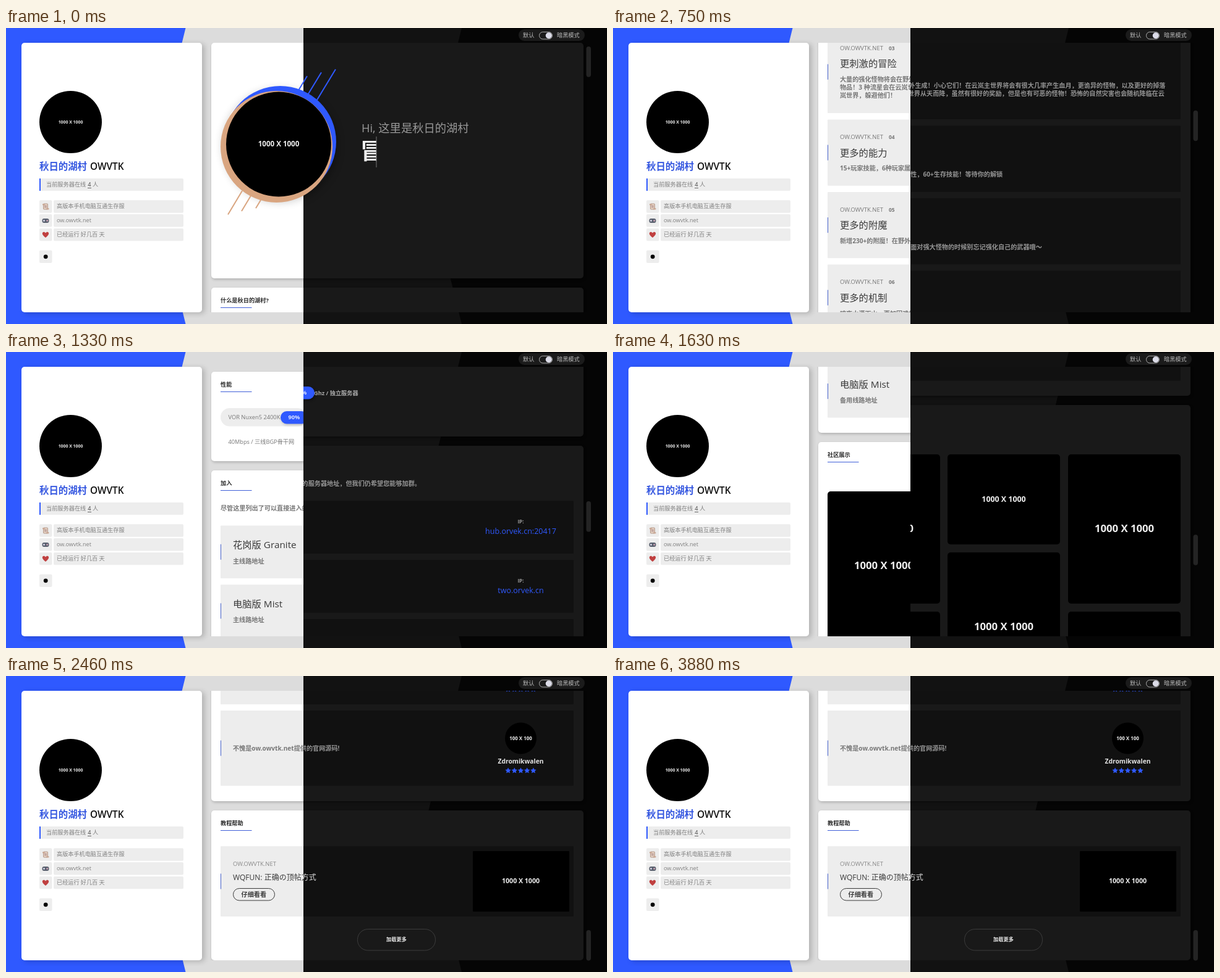
Write an HTML page with a canvas that moves like this. It is 972x480 px and loops after 4000 ms.

```html
<!DOCTYPE html>
<html lang="zh">
<head>
<meta charset="utf-8">
<style>
html, body { margin: 0; width: 100%; height: 100%; overflow: hidden; background: #050505; }
canvas { display: block; }
</style>
</head>
<body>
<canvas id="stage" width="972" height="480"></canvas>
<script>
const ctx = document.getElementById('stage').getContext('2d');
const LOOP = 4000, STEP = 1000 / 24, SPLIT = 481, END = 3330;
const BLUE = '#2f59ff', TAN = '#d9a580';
const TOWN = '秋日的湖村', SITE = 'ow.owvtk.net';

const LIGHT = { left: BLUE, right: '#dcdcdc', edge: 290.5, card: '#fff', item: '#ededed', head: '#2a2a2a', title: '#3a3a3a',
  body: '#777', shadow: 'rgba(0,0,0,.2)', badge: 466,
  path: [[20, 0], [200, 70], [375, 281], [750, 915], [1333, 1808], [1875, 2650], [2080, 2965], [2270, 3250], [2455, END]] };
const DARK = { left: '#121212', right: '#050505', edge: 737, card: '#191919', item: '#111', head: '#ddd', title: '#ddd',
  body: '#949494', shadow: 'rgba(0,0,0,.4)', badge: 477,
  path: [[20, 0], [200, 78], [375, 314], [750, 905], [1333, 1848], [1875, 2724], [2084, 3055], [2252, 3262], [2420, END]] };
let theme = LIGHT;

// Smooth curve through [time, offset] points, at rest on both ends.
function scrollAt(path, t) {
  const last = path.length - 1;
  if (t <= path[0][0]) return 0;
  if (t >= path[last][0]) return END;
  const i = path.findIndex(p => p[0] > t) - 1;
  const slope = k => k < 1 || k >= last ? 0 : (path[k + 1][1] - path[k - 1][1]) / (path[k + 1][0] - path[k - 1][0]);
  const [t0, a] = path[i], [t1, b] = path[i + 1], d = t1 - t0, u = (t - t0) / d;
  return a + (b - a) * u * u * (3 - 2 * u) + d * u * (1 - u) * (slope(i) * (1 - u) - slope(i + 1) * u);
}

function text(str, x, y, size, color, weight = 400, align = 'left') {
  ctx.font = `${weight} ${size}px "Open Sans", "Noto Sans CJK SC", "Noto Sans CJK", sans-serif`;
  ctx.textAlign = align;
  ctx.textBaseline = 'middle';
  ctx.fillStyle = color;
  ctx.fillText(str, x, y + size * 0.04);
  return ctx.measureText(str).width;
}
const body = (str, x, y) => text(str, x, y, 10.13, theme.body, 700);
const center = (str, x, y, size, color = '#eee') => text(str, x, y, size, color, 700, 'center');

function box(x, y, w, h, r, fill, stroke) {
  ctx.beginPath();
  ctx.roundRect(x, y, w, h, r);
  if (fill) { ctx.fillStyle = fill; ctx.fill(); }
  if (stroke) { ctx.strokeStyle = stroke; ctx.lineWidth = 1; ctx.stroke(); }
}
function disc(x, y, r, fill) {
  ctx.beginPath();
  ctx.arc(x, y, r, 0, 7);
  ctx.fillStyle = fill;
  ctx.fill();
}
function line(x1, y1, x2, y2, color, width = 1) {
  ctx.beginPath();
  ctx.moveTo(x1, y1);
  ctx.lineTo(x2, y2);
  ctx.strokeStyle = color;
  ctx.lineWidth = width;
  ctx.stroke();
}
function shaded(draw, blur = 4, dx = 1, dy = 2) {
  ctx.save();
  ctx.shadowColor = theme.shadow;
  ctx.shadowBlur = blur;
  ctx.shadowOffsetX = dx;
  ctx.shadowOffsetY = dy;
  draw();
  ctx.restore();
}
function clipTo(x, y, w, h, draw) {
  ctx.save();
  ctx.beginPath();
  ctx.rect(x, y, w, h);
  ctx.clip();
  draw();
  ctx.restore();
}
function star(x, y) {
  ctx.beginPath();
  for (let i = 0; i < 10; i++) {
    const r = i % 2 ? 2.4 : 5, a = i * Math.PI / 5;
    ctx.lineTo(x + r * Math.sin(a), y - r * Math.cos(a));
  }
  ctx.fillStyle = BLUE;
  ctx.fill();
}

function card(top, bottom, title) {
  shaded(() => box(332, top, 602, bottom - top, 5, theme.card));
  if (!title) return;
  text(title, 347, top + 21.5, 9.2, theme.head, 700);
  line(347, top + 32.5, 397.5, top + 32.5, '#3f5fd8');
}
function item(top, height) {
  box(347, top, 571, height, 1, theme.item);
  ctx.fillStyle = '#4560c8';
  ctx.fillRect(347, top + height / 2 - 12.5, 1, 25);
}
function picture(x, top, height, size) {
  box(x, top, 182, height, 5, '#000');
  center('1000 X 1000', x + 91, top + height / 2, size);
}

function hero() {
  card(24, 406);
  shaded(() => disc(441, 188.5, 92, theme.card), 14);
  for (const [x, y, dx] of [[533, 67, 31], [510, 72, 23], [487, 78, 15]])
    line(x, y, x - dx, y + dx * 1.65, BLUE, 2);
  for (const [x, y, dx] of [[382, 264, 23], [396, 272, 15], [412, 279, 8]])
    line(x, y, x - dx, y + dx * 1.67, TAN, 2);
  disc(443.5, 184.5, 90.5, BLUE);
  disc(437.5, 192.5, 90.5, TAN);
  disc(441, 188.5, 85, '#000');
  center('1000 X 1000', 441, 188.5, 11.6);
  text('Hi, 这里是' + TOWN, 575, 163.5, 18.3, '#999');
  clipTo(570, 170, 29, 60, () => text('冒', 573, 202, 36, '#eee', 700));
  ctx.fillStyle = '#777';
  ctx.fillRect(598.5, 176, 1, 50);
}

function features() {
  card(421, 610.5, `什么是${TOWN}?`);
  body(TOWN + '为高版本手机电脑互通生存服，拥有大量的特性:', 347, 483);
  const chips = [
    [347, 132, 0, '更贴心的设定:', '超大地皮'],
    [484, 243, 0, '更刺激的世界:', '几十种新遗迹、大地牢、云岚维度'],
    [347, 263, 1, '更刺激的冒险:', '强化怪物、血月升级！自然灾害也来了'],
    [615, 193, 1, '小勇士更强了:', '数十种玩家技能、属性'],
    [347, 152, 2, '全新附..负魔:', '附魔新增230+'],
    [504, 194, 2, '新概念机制:', '各种新机制让你无法想象'],
  ];
  for (const [x, w, row, label, rest] of chips) {
    const y = 522.5 + row * 28.2;
    box(x, y - 11.5, w, 23, 1, theme.item);
    const used = body(label, x + 12, y);
    text(rest, x + 14.5 + used, y, 10.13, theme.body);
  }
}

function details() {
  card(626, 1826, '详细介绍');
  const entries = [
    ['更贴心的设定', '每位玩家都可以免费领取个，地皮世界死亡完全不掉落，正常生成生物等，不再需要野外圈地'],
    ['更刺激的世界', '几十种新遗迹等你探索，大地牢与云岚维度等待你的到来'],
    ['更刺激的冒险', '大量的强化怪物将会在野外生成！小心它们！在云岚主世界将会有很大几率产生血月，更诡异的怪物，以及更好的掉落',
      '物品！3 种流星会在云岚世界从天而降，虽然有很好的奖励，但是也有可恶的怪物！恐怖的自然灾害也会随机降临在云', '岚世界，躲避他们！'],
    ['更多的能力', '15+玩家技能，6种玩家属性，60+生存技能！等待你的解锁'],
    ['更多的附魔', '新增230+的附魔！在野外面对强大怪物的时候别忘记强化自己的武器哦～'],
    ['更多的机制', '暗夜水源下山，更加困难的生存'],
    ['更多的物品', '全新的武器与护甲，在探索中获得它们，和朋友们一起收集', '完整的套装'],
    ['更多的玩法', '各种新机制让你无法想象，每天都有新的任务等你完成', '并获得奖励'],
    ['更好的体验', '稳定的线路，电脑与手机都可以流畅地进入游戏', '随时随地游玩'],
  ];
  let top = 684;
  entries.forEach(([title, ...lines], i) => {
    const height = 94 + 13.3 * lines.length;
    item(top, height);
    text(SITE.toUpperCase(), 367, top + 29, 9.4, theme.body);
    text('0' + (i + 1), 446, top + 29, 8.4, theme.body, 700);
    text(title, 367, top + 54.5, 15.3, theme.title);
    lines.forEach((str, k) => body(str, 367, top + 80 + 13 * k));
    top += height + 10.3;
  });
}

function performanceCard() {
  card(1841, 1986, '性能');
  box(347, 1900, 140, 29.5, 15, theme === LIGHT ? theme.item : theme.card);
  text('VOR Nuxen5 2400K', 359.5, 1915, 9.3, theme.body);
  text('Ghz / 独立服务器', 498, 1916, 9.2, '#aaa', 700);
  shaded(() => box(theme.badge - 22, 1905, 44, 20.5, 10, BLUE));
  center('90%', theme.badge, 1915, 9.2, '#dfe6ff');
  text('40Mbps / 三线BGP骨干网', 359.5, 1955.5, 9.2, theme.body);
}

function join() {
  card(2001, 2392, '加入');
  body('尽管这里列出了可以直接进入的服务器地址，但我们仍希望您能够加群。', 347, 2063);
  const servers = [
    ['花岗版 Granite', '主线路地址', 'hub.orvek.cn:20417'],
    ['电脑版 Mist', '主线路地址', 'two.orvek.cn'],
    ['电脑版 Mist', '备用线路地址', 'alt.orvek.cn'],
  ];
  servers.forEach(([title, note, address], i) => {
    const top = 2090.5 + 95.7 * i;
    item(top, 85.5);
    text(title, 367, top + 32, 15.3, theme.title);
    body(note, 367, top + 58);
    center('IP:', 832.5, top + 34.5, 8.2, '#999');
    text(address, 832.5, top + 50, 12.5, BLUE, 400, 'center');
  });
}

function gallery() {
  card(2407, 2916.5, '社区展示');
  for (const x of [347, 736]) {
    picture(x, 2487, 242, 16.7);
    picture(x, 2742, 146, 12.4);
  }
  picture(541, 2487, 146, 12.4);
  picture(541, 2646, 242, 16.7);
  text('社区C', 745, 2869, 12.3, '#333');
  text('shequ', 745, 2881.5, 6.2, '#2a2a2a', 700);
}

function reviews() {
  card(2931, 3533, '玩家评价');
  const entries = [
    ['WQFUN有你更精彩~', 'DimKite'],
    ['非常好玩的服务器！', 'LowFern'],
    ['和朋友们一起玩很开心！', 'Tamselo'],
    [`不愧是${SITE}提供的官网源码!`, 'Zdromikwalen'],
  ];
  entries.forEach(([quote, name], i) => {
    const top = 2990 + 132 * i;
    item(top, 122);
    body(quote, 367, top + 61.5);
    disc(832.5, top + 45, 25.5, '#000');
    center('100 X 100', 832.5, top + 45.5, 7.9);
    center(name, 832.5, top + 83, 10.3, '#e4e4e4');
    for (let k = -2; k <= 2; k++) star(832.5 + k * 10.2, top + 97.5);
  });
}

function tutorials() {
  card(3548, 3791, '教程帮助');
  item(3606, 114);
  text(SITE.toUpperCase(), 367, 3635, 9.4, '#888');
  text('WQFUN: 正确の顶帖方式', 367, 3657, 12, theme.title);
  box(367.5, 3674.5, 67, 19.5, 10, null, theme.title);
  text('仔细看看', 380.5, 3685, 10.2, theme.title, 700);
  box(755, 3614, 156, 98, 1, '#000');
  center('1000 X 1000', 832.5, 3663, 10.6);
  box(568.5, 3740.5, 126, 34.5, 17, null, '#3c3c3c');
  center('加载更多', 631.5, 3758, 8.2);
}

function backdrop() {
  ctx.fillStyle = theme.right;
  ctx.fillRect(0, 0, 972, 480);
  ctx.fillStyle = theme.left;
  ctx.beginPath();
  for (const [x, y] of [[0, 0], [theme.edge, 0], [theme.edge - 59, 240], [theme.edge, 480], [0, 480]]) ctx.lineTo(x, y);
  ctx.fill();
}

function sidebar() {
  shaded(() => box(25, 24, 292, 437, 5, '#fff'), 8, 4, 2);
  disc(104.5, 152.5, 50.5, '#000');
  center('1000 X 1000', 104.5, 152.5, 6.9);
  text(TOWN, 54, 225, 15.4, '#3557e0', 700);
  text('OWVTK', 136, 225, 15.4, '#111', 600);
  box(54, 244, 233, 20, 2, '#ededed');
  ctx.fillStyle = BLUE;
  ctx.fillRect(54, 244, 2, 20);
  text('当前服务器在线', 65, 254.5, 9.2, '#808080');
  text('4', 132.3, 254.5, 9.2, '#444');
  line(132, 259.5, 138, 259.5, '#666');
  text('人', 140, 254.5, 9.2, '#808080');
  ['高版本手机电脑互通生存服', SITE, '已经运行 好几百 天'].forEach((str, i) => {
    const y = 289.5 + 22.8 * i;
    box(54, y - 10.2, 20.5, 20.4, 2, '#ededed');
    box(77, y - 10.2, 210, 20.4, 2, '#ededed');
    text(str, 82, y, 9.15, '#808080');
  });
  // scroll, gamepad and heart icons
  box(60.5, 285, 7, 9, 1, '#e3cfc0', '#b59a8c');
  box(59, 285, 4, 2.5, 1, '#c9a896');
  box(65, 292, 4.5, 2.5, 1, '#c9a896');
  for (const y of [288.5, 290.5]) line(62, y, 66, y, '#a88');
  box(58.5, 309, 11, 7, 3, '#59606e');
  disc(61.5, 312.5, 1.4, '#dde');
  disc(66.7, 312.5, 1.4, '#c8a0b0');
  ctx.beginPath();
  ctx.moveTo(64, 340);
  ctx.bezierCurveTo(54, 333, 61, 328, 64, 332.5);
  ctx.bezierCurveTo(67, 328, 74, 333, 64, 340);
  ctx.fillStyle = '#c04040';
  ctx.fill();
  box(54, 360.5, 20.5, 20.5, 2, '#ededed');
  disc(64.2, 370.8, 3.4, '#000');
}

function darkControls(offset) {
  box(829, 2, 107, 19, 9.5, '#1b1b1b');
  text('默认', 836, 12.5, 9.2, '#bbb');
  box(862.5, 6.5, 21, 11.5, 5.7, null, '#aaa');
  disc(877.8, 12.2, 5, '#dcdce8');
  text('暗黑模式', 891, 12.5, 9.2, '#bbb');
  box(938.5, 30 + 382 * offset / END, 7.5, 49.5, 3.7, '#242424');
}

function page(t) {
  const offset = Math.round(scrollAt(theme.path, t));
  backdrop();
  clipTo(318, 24, 628, 437, () => {
    ctx.translate(0, -offset);
    for (const section of [hero, features, details, performanceCard, join, gallery, reviews, tutorials]) section();
  });
  if (theme === LIGHT) sidebar();
  else darkControls(offset);
}

function frame() {
  // The picture advances 24 times a second; the small lead absorbs rounding of the step times.
  const t = Math.floor((performance.now() % LOOP + 5) / STEP) * STEP;
  theme = LIGHT;
  clipTo(0, 0, SPLIT, 480, () => page(t));
  theme = DARK;
  clipTo(SPLIT, 0, 972 - SPLIT, 480, () => page(t));
  requestAnimationFrame(frame);
}
frame();
</script>
</body>
</html>
```
